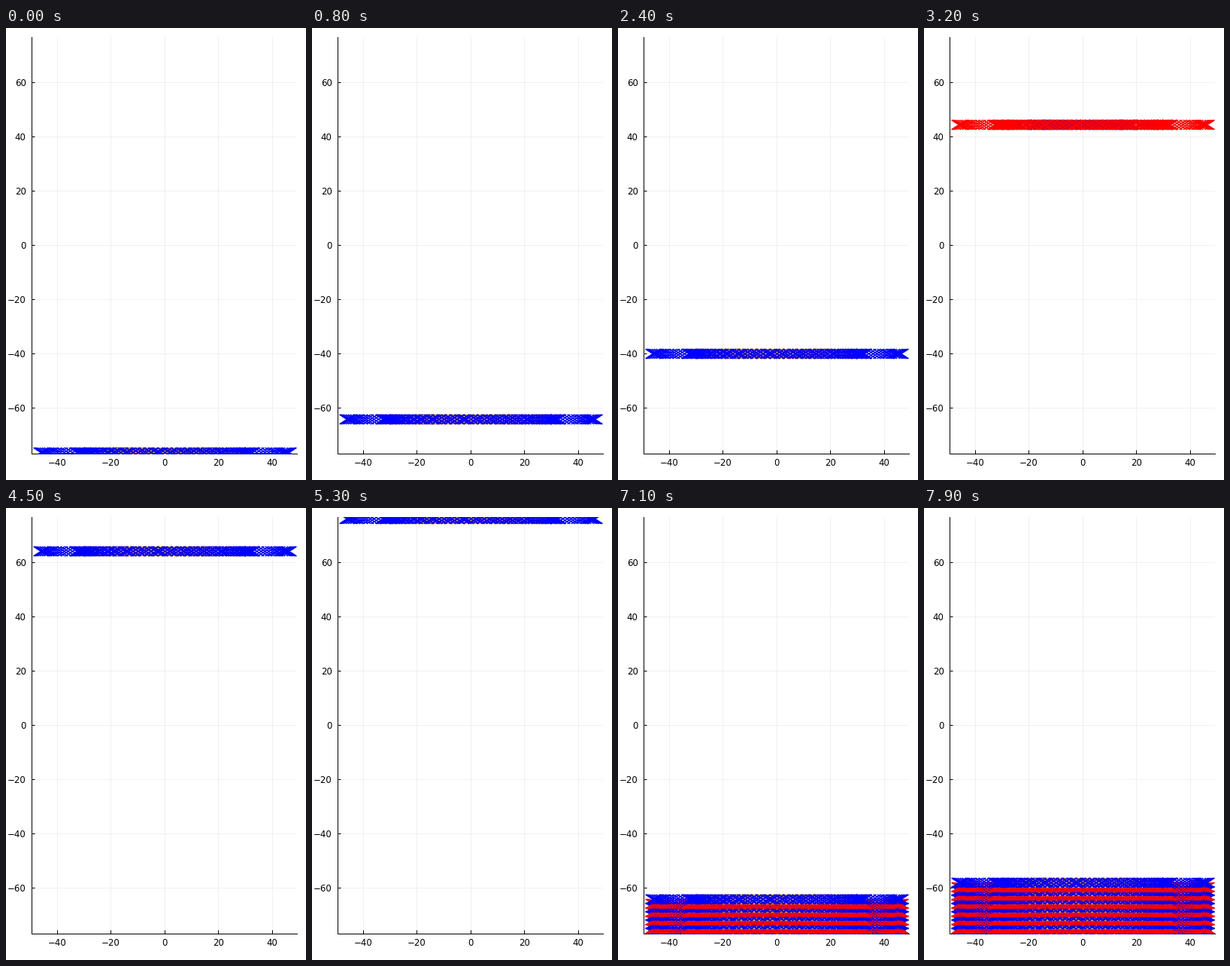
These frames come from a looping animation (399 by 600 pixels, 8000 ms). A matplotlib script:

```python
import numpy as np
import matplotlib.pyplot as plt
from matplotlib.animation import FuncAnimation
from matplotlib.path import Path

W, H, DPI = 399, 600, 100
ROWS = 27             # rings on each half of the cylinder
SCAN = 2 * ROWS       # frames that show one ring at a time
FRAMES = 80
Z0, PITCH = -76.33, 1.52

PT = 72 / DPI
plt.rcParams["font.family"] = "DejaVu Sans"

# A flat diagonal cross, wider than tall.
CROSS = Path([(-1, -0.65), (1, 0.65), (-1, 0.65), (1, -0.65)],
             [Path.MOVETO, Path.LINETO] * 2)


def ring_pair(*radii, n=120):
    """Side view of concentric rings: only x remains."""
    angle = np.linspace(0, 2 * np.pi, n, endpoint=False)
    return np.concatenate([r * np.cos(angle) for r in radii])


# Each row is an inner pair of rings covered by an outer pair.
PAIRS = [ring_pair(30.6, 17.5), ring_pair(46.2, 32.6)]
COLORS = [("orange", "blue"), ("purple", "red")]

fig = plt.figure(figsize=(W / DPI, H / DPI), dpi=DPI, facecolor="white")
left, right, top, bottom = 34.4, 387, 11.5, 565.1
ax = fig.add_axes([left / W, 1 - bottom / H, (right - left) / W, (bottom - top) / H])
ax.set(xlim=(-49.35, 49.35), ylim=(-76.9, 76.9),
       xticks=range(-40, 41, 20), yticks=range(-60, 61, 20))
ax.set_axisbelow(True)
ax.grid(color="black", alpha=0.06, lw=1 * PT)
ax.spines[["top", "right"]].set_visible(False)
for side in ("left", "bottom"):
    ax.spines[side].set_linewidth(1 * PT)
ax.tick_params(direction="in", labelsize=11.7 * PT, width=1 * PT)
ax.tick_params(axis="x", length=5 * PT, pad=5.5 * PT)
ax.tick_params(axis="y", length=4 * PT, pad=7.7 * PT)

layers = [
    ax.plot([], [], ls="none", marker=CROSS, ms=19.5 * PT, mfc="none",
            mew=1.2 * PT, zorder=5 + 0.01 * i)[0]
    for i in range(FRAMES - SCAN)
]


def place(layer, part, row, mirrored=False):
    z = Z0 + PITCH * row
    x = PAIRS[part]
    layer.set_data(x, np.full_like(x, -z if mirrored else z))
    layer.set_color(COLORS[row % 2][part])
    layer.set_visible(True)


def draw(i):
    for layer in layers:
        layer.set_visible(False)
    if i < SCAN:
        mirrored = i >= ROWS
        row = SCAN - 1 - i if mirrored else i
        for part in (0, 1):
            place(layers[part], part, row, mirrored)
    else:
        # Build up the stack, two layers per row.
        for k in range(i - SCAN + 1):
            place(layers[k], k % 2, k // 2)
    return layers


anim = FuncAnimation(fig, draw, frames=FRAMES, interval=100,
                     init_func=lambda: layers, repeat=True, repeat_delay=0)
plt.show()
```
